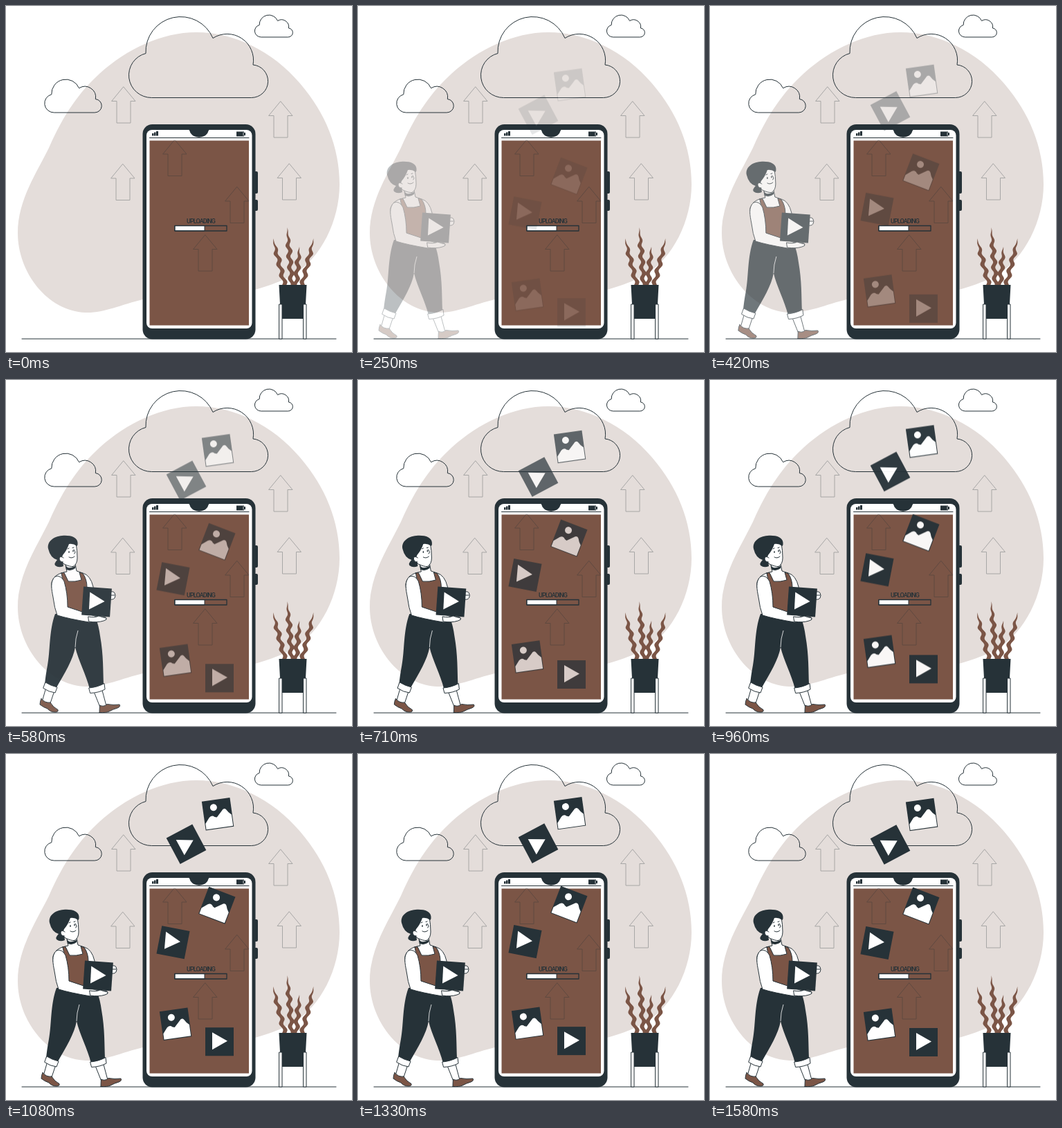
Recreate the animation shown at these times as an HTML page. Size 500 by 500 pixels, loop 1.62 s.

```html
<!DOCTYPE html>
<html lang="en">
<head>
<meta charset="utf-8">
<title>Uploading</title>
<style>
  html, body { margin: 0; width: 100%; height: 100%; overflow: hidden; background: #fff; }
  svg { display: block; width: 100vw; height: 100vh; }
  .dark { fill: #263238; }
  .brown { fill: #7b5546; }
  .white { fill: #fff; }
  .line { fill: none; }
  .line, .edge { stroke: #263238; stroke-width: 1; stroke-linejoin: round; stroke-linecap: round; vector-effect: non-scaling-stroke; }
  text { font: 500 9px Roboto, "Open Sans", sans-serif; font-stretch: condensed; letter-spacing: -.9px; }
</style>
</head>
<body>
<svg viewBox="0 0 500 500">
  <defs>
    <path id="cloud" class="line" d="M210 132.500A32.500 32.500 0 0 1 202 68.500A50.500 50.500 0 0 1 299 46.500A38 38 0 0 1 357 85A23.800 23.800 0 0 1 355 132.500Z"/>
    <path id="arrow" class="line" d="M0 0L17 20.500H10V52H-10V20.500H-17Z"/>
    <path id="triangle" class="white" d="M-10.500 -12.500L11.500 0L-10.500 12.500Z"/>
    <rect id="tile" class="dark" x="-20.500" y="-20.500" width="41" height="41"/>
    <g id="photo">
      <rect class="dark" x="-20.500" y="-20.500" width="41" height="42"/>
      <circle class="white" cx="-4.800" cy="-9.800" r="5"/>
      <path class="white" d="M-19.500 12L-13 4Q-9 0 -5 4L-2 5L6 -3Q10 -8 13 -4Q15 0 19.500 4V20.500H-19.500Z"/>
    </g>
  </defs>

  <path fill="#e4dddA" d="M275 38C330 38 385 65 425 112C462 155 482 205 482 258C482 310 455 365 415 388C395 400 368 409 330 417C285 416 240 414 198 424C165 432 140 444 115 443C60 441 17 385 17 328C17 280 45 240 62 205C83 157 106 124 136 97C175 62 225 38 275 38Z"/>
  <use href="#cloud"/>
  <use href="#cloud" transform="translate(-17 99.7) scale(.41)"/>
  <use href="#cloud" transform="translate(311 8.8) scale(.273)"/>
  <path class="line" d="M23 481H477"/>

  <g id="plant">
    <path class="white edge" d="M395 431h4v50h-4zM430 431h4v50h-4z"/>
    <path class="dark" d="M394.500 403H434.500L433 431H430V452H399V431H396Z"/>
  </g>

  <g id="phone">
    <path class="dark" d="M356 239h6q2 0 2 2v28q0 2 -2 2h-6zM356 280h6q2 0 2 2v12q0 2 -2 2h-6z"/>
    <rect class="dark" x="197.500" y="171" width="163" height="310.500" rx="14"/>
    <rect class="white" x="203" y="179" width="152.500" height="287" rx="8"/>
    <rect class="brown" x="207.500" y="194.500" width="143.500" height="267"/>
    <path class="dark" d="M261 178C266 178 265 181 267 184C272 191.500 286 191.500 291 184C293 181 292 178 297 178Z"/>
    <path class="line" d="M207.500 190.500H351"/>
    <path class="dark" d="M211 184h2.500v3.500h-2.500zM214 182.500h2.500v5h-2.500zM217 181h3v6.500h-3z"/>
    <path class="dark" d="M333 181.500h11v1.500h2v4h-2v1.500h-11z"/>
    <path stroke="#fff" stroke-width=".7" d="M343 182.500v5"/>
    <path class="white edge" d="M244 317.500h43v7.500h-43z"/>
    <path class="line" style="stroke-width:1.3" d="M244 317.500h75v7.500h-75z"/>
    <text class="dark" x="281.500" y="314" text-anchor="middle">UPLOADING</text>
  </g>
  <g id="arrows" opacity=".32"></g>

  <g id="cards">
    <use href="#photo" transform="translate(306 87) rotate(-8)"/>
    <use href="#photo" transform="translate(245 390.500) rotate(-8)"/>
    <use href="#photo" transform="translate(305 219) rotate(21)"/>
    <use href="#tile" transform="translate(260.500 131) rotate(-28) scale(1.04)"/>
    <use href="#triangle" transform="translate(258 135.500) rotate(91)"/>
    <use href="#tile" transform="translate(241.500 273) rotate(11)"/>
    <use href="#triangle" transform="translate(240.500 271) rotate(5)"/>
    <use href="#tile" transform="translate(308.500 416.500)"/>
    <use href="#triangle" transform="translate(308.500 415.500)"/>
  </g>

  <g id="person">
    <!-- legs and shoes -->
    <path class="white edge" d="M60 444L54 465L65 470L72 449ZM128 448L138 473L147 471L140 445Z"/>
    <path class="brown edge" d="M53 460.500Q58 467 66 466Q70 473 77 476.500Q78 480 73 480Q66 480 62 475Q56 473 51 469Q51 464 53 460.500ZM137 480.500Q137 475 137.500 470Q143 473 148 468.500Q157 470 166 469Q168 472 163 474Q156 476 151 479Q147 481 137 480.500Z"/>
    <path class="dark" d="M73 338C64 362 66 392 62 412Q59 428 58 440L74 446C87 423 99 404 102 386C106 404 118 426 123 447L143 440C142 420 143 398 138 370Q136 355 132 345L110 336Z"/>
    <path fill="none" stroke="#fff" stroke-width=".8" d="M106 362Q102 374 102 386"/>
    <path class="white edge" d="M59 437Q67 442 76 444L73 452Q64 451 56 445.500ZM122 445Q134 444 144 438.500L145 447Q136 452 124 452.500Z"/>
    <!-- torso and arms -->
    <path class="white edge" d="M88 268L90 277Q78 279 73 284Q66 291 68 300L86 335L128 330V299Q124 282 113 279L104 276L102 266Z"/>
    <path class="brown edge" d="M82 279L86 278.500L92 291Q102 292 111 289L108 278L113 279.500Q119 288 119 300L114 340L84 340Q90 312 82 279Z"/>
    <path class="white edge" d="M73 284C65 291 68 303 70 314Q72 330 76 340Q92 345 122 350Q134 350 147 346L146 343L130 341L91 328Q91 308 86 291Q81 281 73 284Z"/>
    <path class="white edge" d="M152 306Q158 305 159 308Q161 311 159 315Q157 318 151 317M153 311H159"/>
    <g transform="translate(133 320.500) rotate(4)">
      <use href="#tile"/>
      <use href="#triangle" transform="translate(0 -1) rotate(-1)"/>
    </g>
    <path class="white edge" d="M121 342Q130 344 136 341Q142 343 147 344Q148 347 143 348Q134 351 122 349Z"/>
    <!-- head -->
    <path class="dark" d="M88 267Q91 275 103 268L102 272Q96 277 89 274Z"/>
    <path class="white edge" d="M79 247Q78 262 86 266Q94 270 99 269.500Q105 266 105 257Q105 246 103 236L88 234Z"/>
    <path class="dark" d="M105.500 235C105 227 95 224 83 225C70 226 61 234 63 244Q66 257 76 260Q71 265 73 268Q78 272 85 269L84 261Q82 257 84 253Q90 246 93 237Q99 236 104.500 240Q106 238 105.500 235Z"/>
    <path class="white edge" d="M84 263Q79 263 79 257Q81 254 85 257"/>
    <path class="line" stroke-width=".8" d="M100 245Q104 250 100.500 251M93 256Q97 258.500 101 255M91 244L93 243M98 242.500L100 242"/>
    <ellipse class="dark" cx="93" cy="248.500" rx=".8" ry="1.600"/>
    <ellipse class="dark" cx="99" cy="247" rx=".8" ry="1.600"/>
  </g>
</svg>
<script>
const LOOP = 1620;
const byId = id => document.getElementById(id);

function add(parent, tag, attrs) {
  const el = document.createElementNS("http://www.w3.org/2000/svg", tag);
  for (const name in attrs) el.setAttribute(name, attrs[name]);
  parent.prepend(el);
}

for (const [x, y] of [[170, 117], [397, 138], [169, 228.5], [409.5, 228], [244, 193.5], [334, 261.5], [288, 331]])
  add(byId("arrows"), "use", { href: "#arrow", x, y });

// Wavy leaf tapering from its root to its tip
function leaf(rootX, tipX, tipY, phase) {
  const left = [], right = [];
  for (let i = 0; i <= 50; i++) {
    const k = i / 50, y = 404 + (tipY - 404) * k;
    const taper = Math.min(1, 3 * (1 - k));
    const x = rootX + (tipX - rootX) * k + 1.9 * Math.sin(y / 2.55 + phase) * taper;
    left.push(`${x - 3.1 * taper} ${y}`);
    right.unshift(`${x + 3.1 * taper} ${y}`);
  }
  add(byId("plant"), "path", { class: "brown", d: `M${left.concat(right).join("L")}Z` });
}
leaf(403, 386, 336, 2.5);
leaf(413, 406.5, 320, 1);
leaf(419, 424, 348, 4);
leaf(428, 444.5, 336, 5.7);

const bezier = (a, b, s) => 3 * a * s * (1 - s) ** 2 + 3 * b * s * s * (1 - s) + s ** 3;

// cubic-bezier(.36, -.01, .5, 1.38)
function ease(x) {
  if (x >= 1) return 1;
  let low = 0, high = 1;
  for (let i = 0; i < 24; i++) {
    const mid = (low + high) / 2;
    if (bezier(.36, .5, mid) < x) low = mid; else high = mid;
  }
  return bezier(-.01, 1.38, low);
}

function slide(id, progress, dx, dy) {
  const rest = 1 - progress;
  byId(id).setAttribute("transform", `translate(${dx * rest} ${dy * rest})`);
  byId(id).setAttribute("opacity", Math.max(0, Math.min(1, progress)));
}

function draw() {
  const t = performance.now() % LOOP;
  const shown = t < 80 ? 0 : t + 38;
  slide("person", ease(shown / 1000), -30, 0);
  slide("cards", ease(shown / 1570), 0, 30);
  requestAnimationFrame(draw);
}
draw();
</script>
</body>
</html>
```
